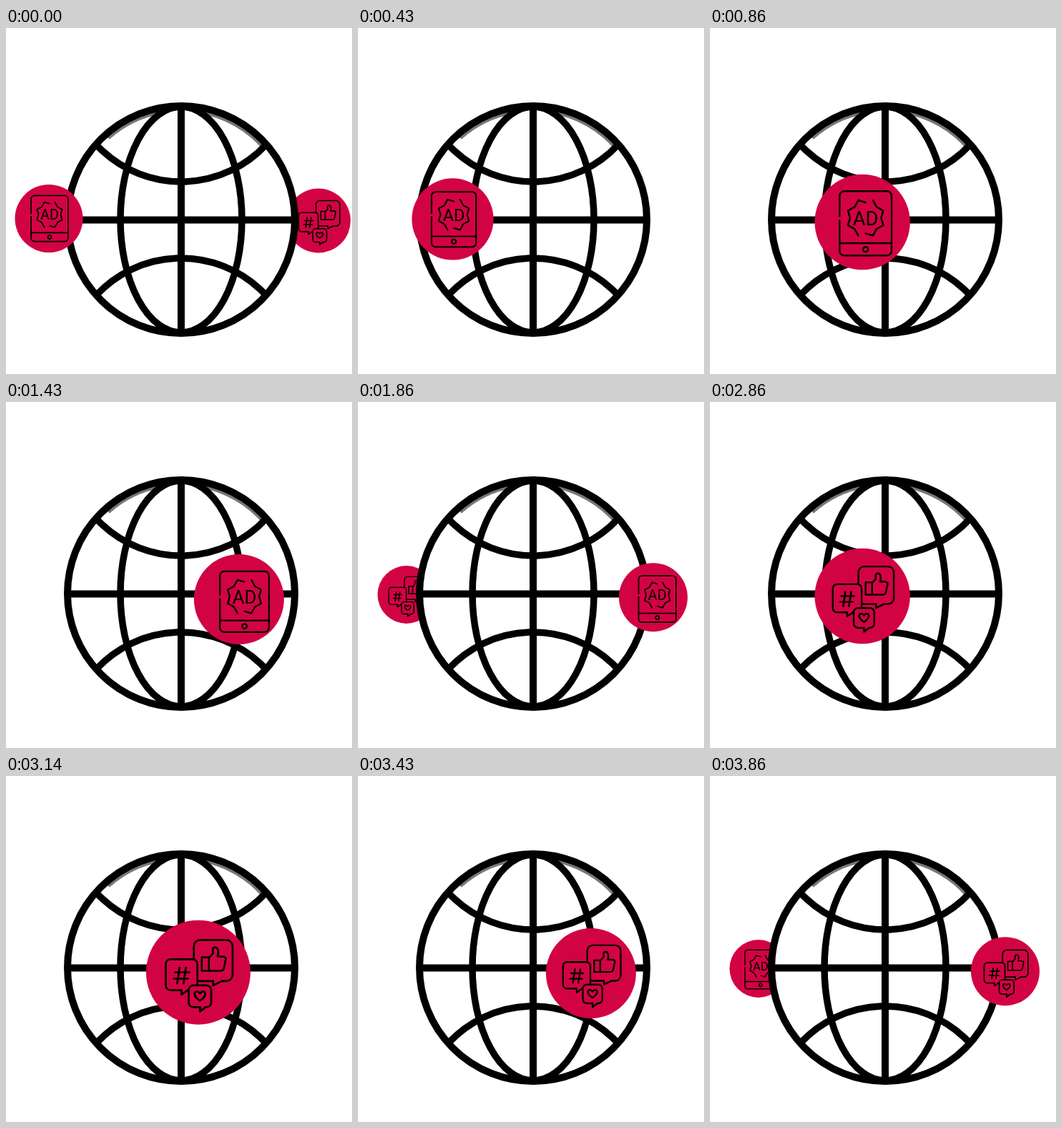
These frames come from a looping animation (484 px wide and 484 px high, 4.01 s). An HTML page with a canvas:

```html
<!DOCTYPE html>
<html lang="en">
<head>
<meta charset="utf-8">
<title>Orbiting badges</title>
<style>
html, body { margin: 0; width: 100%; height: 100%; overflow: hidden; background: #fff; }
canvas { display: block; width: 100vw; height: 100vh; }
</style>
</head>
<body>
<canvas id="stage" width="484" height="484"></canvas>
<script>
const ctx = document.getElementById('stage').getContext('2d');
const LOOP = 4010, STEPS = 28, HALF = STEPS / 2;
const RED = '#d20343', TAU = Math.PI * 2;

// Front half: left to right, swelling to a peak. Back half: steady return.
function orbit(step) {
  if (step >= HALF) {
    const back = step - HALF;
    return { x: 437 - 28.4 * back, dip: 3, r: 45 - 0.35 * back };
  }
  return {
    x: 60 + 353 * (step / 13) ** 1.08,
    dip: 9.5 * Math.sin(Math.PI * step / 20) ** 3,
    r: step < 8 ? 47.5 + 3.2 * step : 73 - 5 * (step - 8)
  };
}

function stroke(build) {
  ctx.beginPath();
  build();
  ctx.stroke();
}

function line(x1, y1, x2, y2) {
  stroke(() => { ctx.moveTo(x1, y1); ctx.lineTo(x2, y2); });
}

// Icons are drawn around their disc's centre at a disc radius of 66.
function drawSeal(cx, cy) {
  stroke(() => {
    for (let i = 0; i <= 16; i++) {
      const a = (i + 1) * TAU / 16, r = i % 2 ? 21.5 : 26.5;
      const x = cx + r * Math.cos(a), y = cy + r * Math.sin(a);
      // Half a lobe stays open at the top and at the bottom
      if (i % 8 === 4) ctx.moveTo(x, y);
      else ctx.lineTo(x, y);
    }
  });
}

function drawAd() {
  stroke(() => ctx.roundRect(-36, -44.5, 72, 89, 6.5));
  line(-36, 27.5, 36, 27.5);
  stroke(() => ctx.arc(0, 36, 3.5, 0, TAU));
  drawSeal(0, -7.5);
  ctx.font = '27px Roboto, sans-serif';
  ctx.textAlign = 'center';
  ctx.fillText('AD', 0, 2.5);
  ctx.fillStyle = RED;
  ctx.fillRect(-38, -9, 4, 4);
}

// A speech bubble that covers whatever lies below it.
function bubble(x, y, w, h, r, tail) {
  const bottom = y + h, mid = x + w / 2;
  ctx.fillStyle = RED;
  ctx.beginPath();
  ctx.roundRect(x, y, w, h, r);
  ctx.fill();
  ctx.stroke();
  ctx.fillRect(mid + 1, bottom - 2, tail - 2, 4);
  stroke(() => {
    ctx.moveTo(mid, bottom);
    ctx.lineTo(mid, bottom + 5.5);
    ctx.lineTo(mid + tail, bottom);
  });
}

function drawThumb(x, y) {
  ctx.strokeRect(x, y, 9, 17);
  stroke(() => {
    ctx.moveTo(x + 9, y + 1);
    ctx.lineTo(x + 14, y - 5);
    ctx.lineTo(x + 14, y - 11);
    ctx.bezierCurveTo(x + 17, y - 15, x + 23, y - 12, x + 20, y - 1);
    ctx.lineTo(x + 27, y - 1);
    ctx.quadraticCurveTo(x + 32, y, x + 30, y + 4);
    ctx.lineTo(x + 28, y + 14);
    ctx.quadraticCurveTo(x + 27, y + 17, x + 24, y + 17);
    ctx.lineTo(x + 9, y + 17);
  });
}

function drawHash(x, y) {
  for (const d of [-4, 4]) {
    line(x + d + 1.5, y - 10, x + d - 1.5, y + 10);
    line(x - 9 - d / 5, y + d, x + 9 - d / 5, y + d);
  }
}

function drawHeart(x, y) {
  stroke(() => {
    for (const side of [-1, 1]) {
      ctx.moveTo(x, y + 6);
      ctx.bezierCurveTo(x + 13 * side, y - 3, x + 4 * side, y - 10, x, y - 3);
    }
  });
}

function drawSocial() {
  bubble(-6.5, -41, 49, 52, 8, 11);
  drawThumb(3.5, -19);
  bubble(-42, -16.5, 40, 39, 6, 8);
  drawHash(-22, 4);
  bubble(-13, 16.5, 28.5, 27.5, 6, 7);
  drawHeart(1.2, 30);
}

function drawBadge({ draw, drift }, step) {
  const { x, dip, r } = orbit(step), y = 266.5 + dip;
  ctx.fillStyle = RED;
  ctx.beginPath();
  ctx.arc(x, y, r, 0, TAU);
  ctx.fill();

  ctx.save();
  ctx.translate(x + 1 + drift * dip, y + drift * dip / 2);
  ctx.scale(r / 66, r / 66);
  ctx.fillStyle = ctx.strokeStyle = '#000';
  ctx.lineWidth = 2.4;
  ctx.lineCap = ctx.lineJoin = 'round';
  draw();
  ctx.restore();
}

function drawGlobe() {
  ctx.fillStyle = '#fff';
  ctx.beginPath();
  ctx.arc(245, 268, 159, 0, TAU);
  ctx.fill();

  ctx.strokeStyle = '#777';
  ctx.lineWidth = 5;
  stroke(() => ctx.arc(245, 268, 153, -2.3, -1.75));
  stroke(() => ctx.arc(245, 268, 153, -1.4, -0.7));

  ctx.strokeStyle = '#000';
  ctx.lineWidth = 9.5;
  stroke(() => ctx.ellipse(245, 268, 85, 158, 0, 0, TAU));
  stroke(() => ctx.arc(245, 53, 162, 0.75, Math.PI - 0.75));
  stroke(() => ctx.arc(245, 484, 162, Math.PI + 0.75, TAU - 0.75));
  ctx.lineWidth = 10;
  stroke(() => ctx.arc(245, 268, 159, 0, TAU));
  line(245, 108, 245, 428);
  line(86, 268.5, 404, 268.5);
}

const badges = [
  { draw: drawAd, shift: 0, drift: 0.7 },
  { draw: drawSocial, shift: HALF, drift: 0 }
];

function render(now) {
  const t = now % LOOP;
  const step = Math.min(STEPS - 1, Math.floor((t + 5) * 7 / 1000));
  const drawLayer = front => badges.forEach(badge => {
    const local = (step + badge.shift) % STEPS;
    if ((local < HALF) === front) drawBadge(badge, local);
  });

  ctx.fillStyle = '#fff';
  ctx.fillRect(0, 0, 484, 484);
  drawLayer(false);
  drawGlobe();
  drawLayer(true);
}

const start = performance.now();
function tick() {
  render(performance.now() - start);
  requestAnimationFrame(tick);
}
tick();
</script>
</body>
</html>
```
